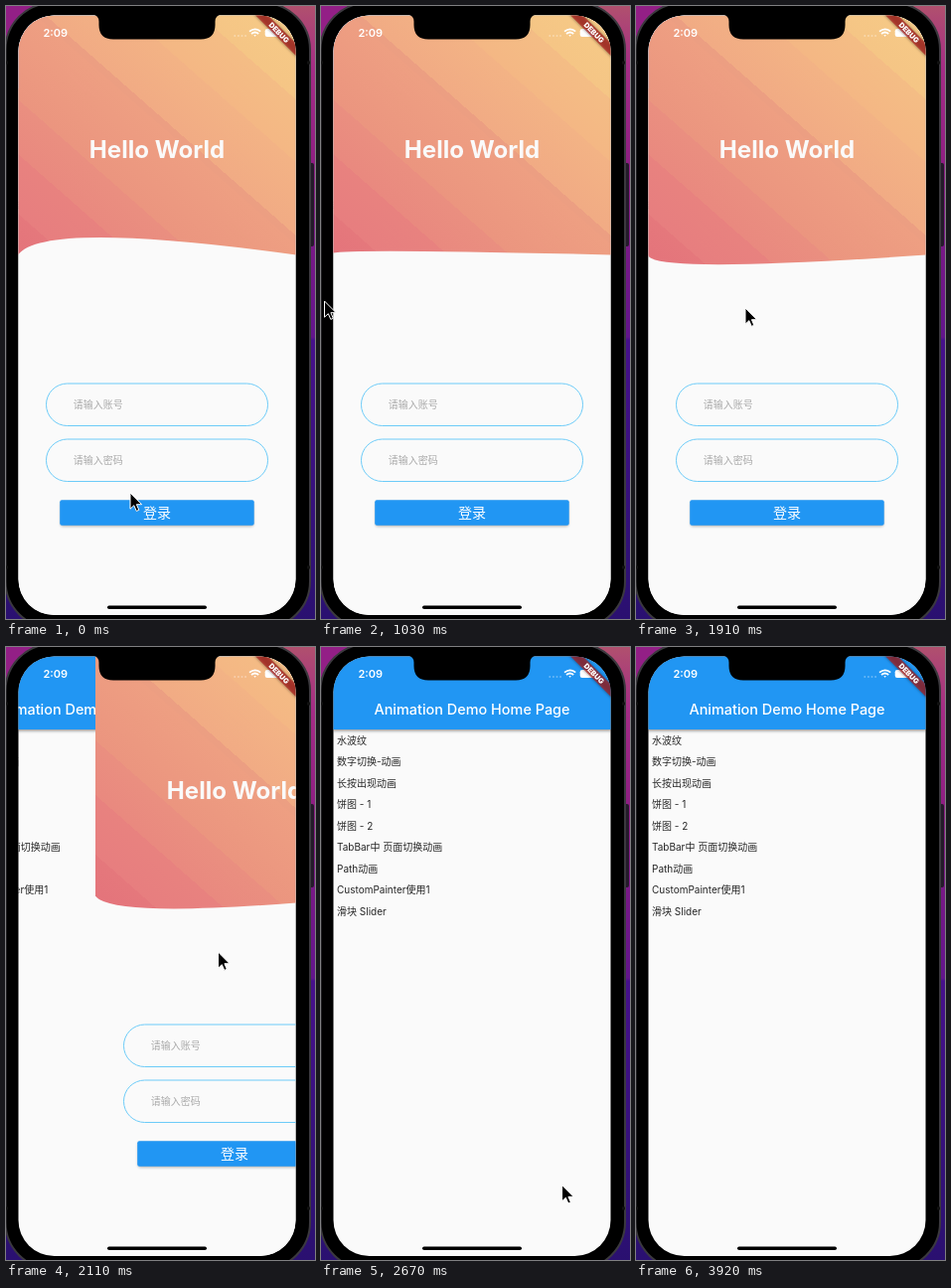
An HTML page for the animation above (4.02 s loop, 311 by 617 pixels).

```html
<!DOCTYPE html>
<html lang="zh-CN">
<head>
<meta charset="utf-8">
<title>Wave login</title>
<style>
  html, body { margin: 0; height: 100%; overflow: hidden; background: #000; }
  svg { display: block; width: 100vw; height: 100vh; }
  text { font-family: Inter, "Noto Sans CJK SC", "Noto Sans CJK", sans-serif; font-size: 10px; fill: #fff; }
  .mid { text-anchor: middle; }
  .hint { fill: #a9a9a9; }
  .field { fill: none; stroke: #6dcbf8; }
  #list text { fill: #262626; }
</style>
</head>
<body>
<svg viewBox="0 0 311 617">
  <defs>
    <clipPath id="screen"><rect x="12.5" y="9.5" width="279" height="603.5" rx="36"/></clipPath>
    <linearGradient id="wall" x2="0" y2="1">
      <stop stop-color="#b0506e"/><stop offset=".1" stop-color="#a52c86"/>
      <stop offset=".28" stop-color="#8a1c82"/><stop offset=".54" stop-color="#62148c"/>
      <stop offset=".545" stop-color="#46108c"/><stop offset="1" stop-color="#2a1070"/>
    </linearGradient>
    <linearGradient id="stripes" gradientUnits="userSpaceOnUse" x1="-119.5" y1="135.8" x2="122" y2="-138.7"/>
    <filter id="blur" x="-20%" y="-80%" width="140%" height="260%"><feGaussianBlur stdDeviation="1.4"/></filter>
  </defs>

  <rect width="311" height="617" fill="url(#wall)"/>
  <rect width="60" height="60" fill="#931f86"/>
  <rect x="304" y="158" width="6" height="84" rx="2" fill="#241a2a"/>
  <rect x="-.5" y="-3" width="306.5" height="629" rx="47" stroke="#3b393e" stroke-width="2"/>
  <path d="M0 57h2M303 57h3M0 565h2M303 565h3" stroke="#111" stroke-width="3"/>

  <g clip-path="url(#screen)">
    <rect x="12" y="9" width="280" height="605" fill="#fafafa"/>
    <g id="home">
      <rect x="12" y="11" width="280" height="73.5" filter="url(#blur)" opacity=".4"/>
      <rect x="12" y="9" width="280" height="74" fill="#2196f3"/>
      <text class="mid" x="152" y="68" style="font-size:14.45px;font-weight:500">Animation Demo Home Page</text>
      <g id="list"></g>
    </g>

    <g id="login">
      <rect x="12" y="9" width="280" height="605" fill="#fafafa"/>
      <path id="wave" transform="translate(12 9)" fill="url(#stripes)"/>
      <text class="mid" x="152" y="153" style="font-size:24.1px;font-weight:700;fill:#fafafa">Hello World</text>
      <rect class="field" x="40.5" y="380" width="223" height="42.5" rx="21.2"/>
      <rect class="field" x="40.5" y="436" width="223" height="42.5" rx="21.2"/>
      <text class="hint" x="67.7" y="404.7">请输入账号</text>
      <text class="hint" x="67.7" y="460.7">请输入密码</text>
      <rect x="55" y="499" width="194" height="24.5" rx="2" filter="url(#blur)" opacity=".35"/>
      <rect x="54.2" y="497.2" width="195.5" height="25.6" rx="2" fill="#2196f3"/>
      <text class="mid" x="152" y="515.2" style="font-size:14px">登录</text>
    </g>

    <text x="37.5" y="31.3" style="font-size:11px;font-weight:600">2:09</text>
    <path d="M229.5 30h13" stroke="#fff" stroke-opacity=".4" stroke-width="1.5" stroke-dasharray="1.6 2"/>
    <g fill="none" stroke="#fff" stroke-width="1.7">
      <path d="M245 25.6q5.6-4.6 11.2 0M247 28q3.6-3 7.2 0"/>
      <path d="M249.3 29.4q1.3-1 2.6 0l-1.3 1.4z" fill="#fff" stroke="none"/>
    </g>
    <rect x="260.7" y="23" width="15" height="8" rx="2.2" fill="#fff"/>

    <g transform="translate(292 9.5) rotate(45)">
      <rect x="-34" y="20" width="68" height="8.8" filter="url(#blur)" opacity=".5"/>
      <rect x="-34" y="20" width="68" height="8.8" fill="#b71c1c" fill-opacity=".66"/>
      <text class="mid" y="27" style="font-size:7.3px;font-weight:900">DEBUG</text>
    </g>
    <rect x="102" y="603.5" width="100" height="3.6" rx="1.8"/>
  </g>
  <path d="M87 8.5q6.5 1 6.5 7V19q0 14.5 14.5 14.5h88q14.5 0 14.5-14.5v-3.5q0-6 6.5-7z"/>
  <path id="cursor" d="M0 0V16.2L3.8 12.7 6.3 18.4 8.8 17.3 6.4 11.7H11.6Z" stroke="#fff" stroke-width="1"/>
</svg>

<script>
const LOOP = 4020;
const $ = id => document.getElementById(id);

function add(parent, tag, attrs, text = "") {
  const el = document.createElementNS("http://www.w3.org/2000/svg", tag);
  for (const key in attrs) el.setAttribute(key, attrs[key]);
  el.textContent = text;
  parent.append(el);
}

["水波纹", "数字切换-动画", "长按出现动画", "饼图 - 1", "饼图 - 2", "TabBar中 页面切换动画",
  "Path动画", "CustomPainter使用1", "滑块 Slider"]
  .forEach((label, i) => add($("list"), "text", { x: 16, y: 97.6 + i * 21.5 }, label));

// Diagonal bands: start, end, first colour, last colour
[[-241, -200, "#e4747b", "#e5787c"], [-200, -140, "#e77e7f", "#e8827f"],
  [-140, -85, "#e9897f", "#ea8f80"], [-85, 15, "#eb957f", "#ee9f82"],
  [15, 24, "#ec9e82", "#ec9f82"], [24, 98, "#f1ab84", "#f3b385"],
  [98, 161, "#f4b784", "#f4bd85"], [161, 246, "#f5c585", "#f6cb87"]]
  .forEach(([from, to, first, last]) => {
    for (const [pos, color] of [[from, first], [to, last]])
      add($("stripes"), "stop", { offset: (pos + 241) / 487, "stop-color": color });
  });

const moments = [0, 80, 200, 350, 590, 670, 760, 940, 1030, 1200, 1270, 1350, 1490,
  1700, 1800, 1910, 2060, 2110, 2200, 2440, 2670];
const pointer = [[0, 125, 490], [80, 108, 462], [200, 55, 380], [350, 2, 297], [590, -1, 293.7],
  [760, -1, 294], [1030, 3.5, 297], [1490, 3.5, 297], [1700, 8, 298], [1910, 110, 304],
  [2110, 213.5, 307], [2200, 238, 345], [2440, 243, 531], [2670, 242.5, 541.5],
  [3160, 264.5, 615], [3250, 266, 640]];
const slide = [[2000, 0], [2060, 28], [2110, 78], [2200, 190], [2440, 280]];

function track(keys, t) {
  const next = keys.findIndex(key => key[0] > t);
  if (next < 1) return keys.at(next).slice(1);
  const [a, b] = [keys[next - 1], keys[next]];
  const k = (t - a[0]) / (b[0] - a[0]);
  return a.slice(1).map((v, i) => v + (b[i + 1] - v) * k);
}

function draw(now) {
  const time = now % LOOP;
  const t = time < 2670 ? moments.findLast(m => m <= time) : time;

  const cx = -25 + 4.2e-5 * (t - 1100) ** 2;
  const cy = 2 * (-17.5 + 0.0122 * t + 1.05e-6 * t * t);
  $("wave").setAttribute("d", `M0 0V241.5Q${cx} ${241.5 + cy} 280 241.5V0Z`);

  const [shift] = track(slide, t);
  $("login").setAttribute("transform", `translate(${shift})`);
  $("home").setAttribute("transform", `translate(${(shift - 280) / 3})`);
  $("cursor").setAttribute("transform", `translate(${track(pointer, t)})`);
  requestAnimationFrame(() => draw(performance.now()));
}
draw(0);
</script>
</body>
</html>
```
